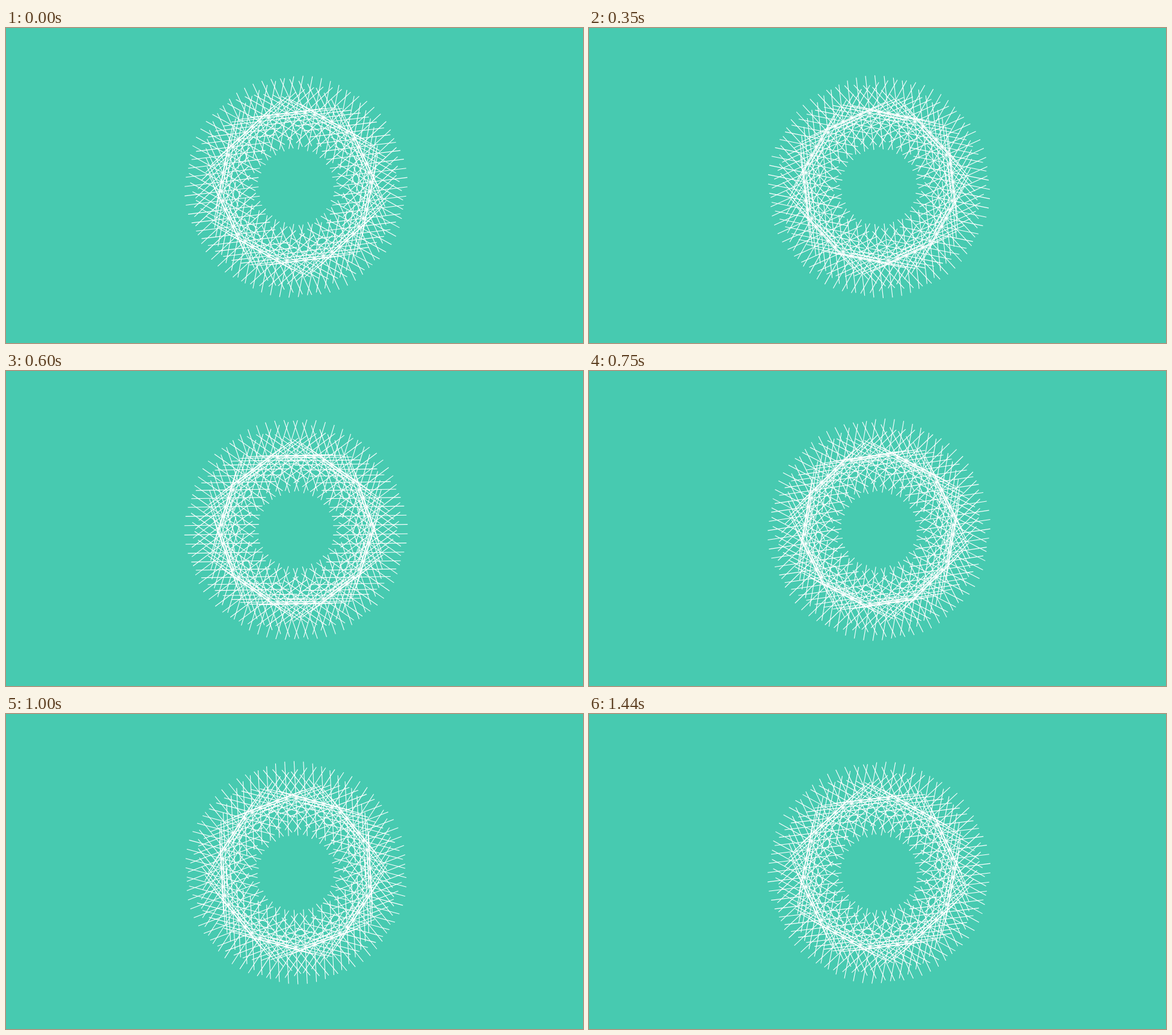
These frames come from a looping animation (960x525 px, 1.53 s). An HTML page with a canvas:

```html
<!DOCTYPE html>
<html lang="en">
<head>
<meta charset="utf-8">
<title>Spinning stars ring</title>
<style>
  html, body { margin: 0; width: 100%; height: 100%; overflow: hidden; background: #47cab0; }
  canvas { display: block; width: 960px; height: 525px; }
</style>
</head>
<body>
<canvas id="stage" width="960" height="525"></canvas>
<script>
const ctx = document.getElementById('stage').getContext('2d');
const LOOP = 1530, STEP = 50, LAST = 1440;
const CX = 482.5, CY = 264.5;
const RING = 124, HALF = 62;      // ring radius, half a ray's length
const STARS = 50, RAYS = 5;
const START = 11, SPEED = -0.05;  // degrees, degrees per ms
const rad = deg => deg * Math.PI / 180;

// Time advances in steps; the closing pose is held.
function stepTime(ms) {
  const t = ms % LOOP;
  return t >= LAST ? LAST : Math.min(Math.floor(t / STEP) * STEP, 1350);
}

function draw(t) {
  ctx.fillStyle = '#47cab0';
  ctx.fillRect(0, 0, 960, 525);
  ctx.strokeStyle = '#fff';
  ctx.lineWidth = 1.1;
  const turn = START + SPEED * t;
  for (let s = 0; s < STARS; s++) {
    const place = rad(s * 360 / STARS);
    const x = CX + RING * Math.sin(place);
    const y = CY - RING * Math.cos(place);
    for (let r = 0; r < RAYS; r++) {
      const a = rad(turn + r * 180 / RAYS);
      const dx = HALF * Math.sin(a), dy = -HALF * Math.cos(a);
      ctx.beginPath();
      ctx.moveTo(x - dx, y - dy);
      ctx.lineTo(x + dx, y + dy);
      ctx.stroke();
    }
  }
}

const begin = performance.now();
let shown = -1;
function tick() {
  const t = stepTime(performance.now() - begin);
  if (t !== shown) draw(shown = t);
  requestAnimationFrame(tick);
}
tick();
</script>
</body>
</html>
```
